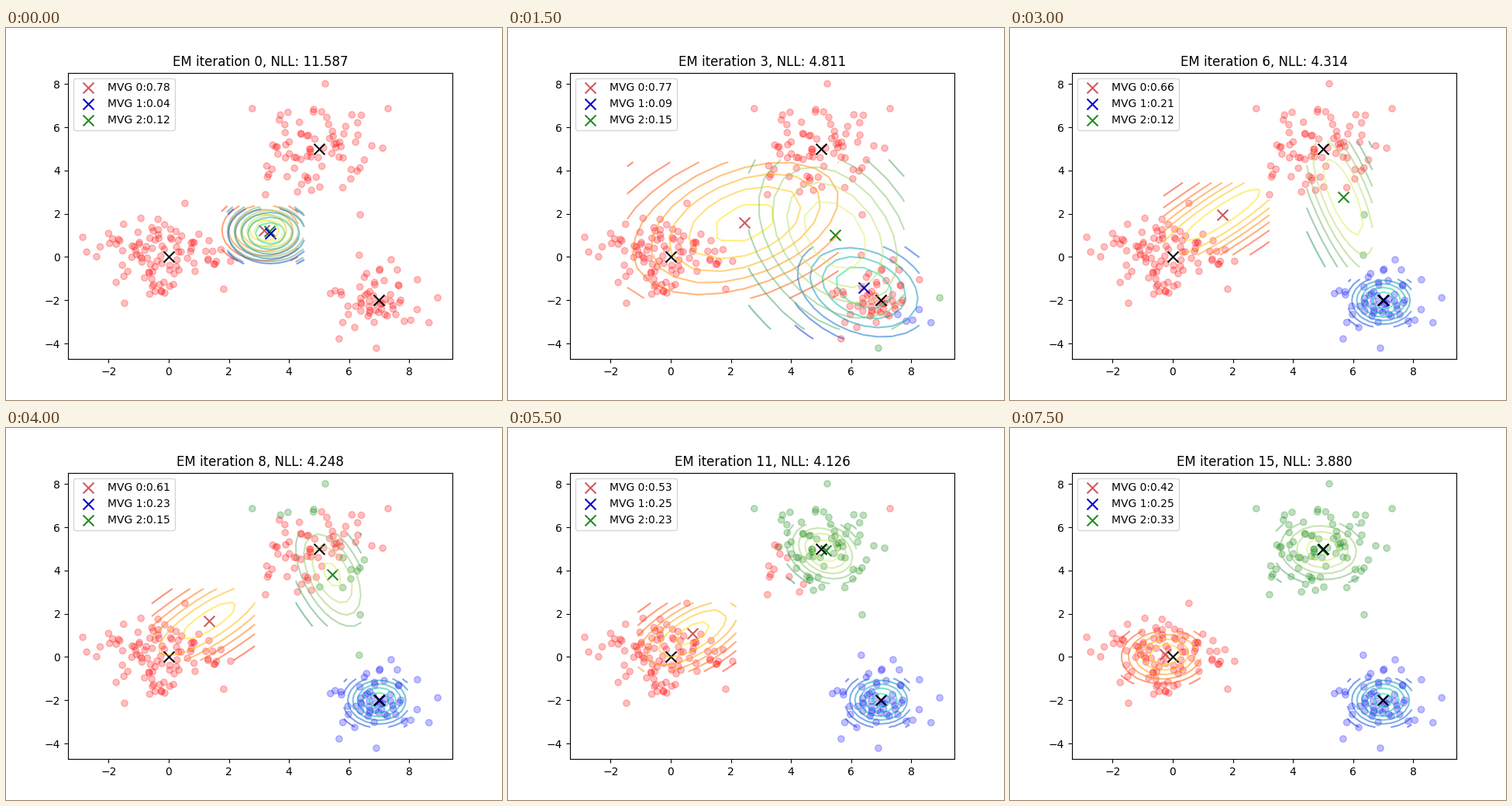
Animation of 640 by 480 pixels, one loop 8 s. Source, as a matplotlib script:

```python
import numpy as np
import matplotlib.pyplot as plt
from matplotlib.animation import FuncAnimation

STEPS = 16
CENTERS = np.array([(0, 0), (7, -2), (5, 5)])
COUNTS = (100, 60, 80)

# Key poses: mean x, mean y, conditional std x, std y, correlation, weight
KEYS = (0, 2, 4, 6, 10, 13, 15)
RED = [
    (3.17, 1.23, 1, 1, 0, .78),
    (2.81, 1.37, 3.136, 2.79, .21, .81),
    (2.11, 1.80, 2.39, 2.16, .6, .73),
    (1.65, 1.95, 1.386, 1.315, .9, .66),
    (1.03, 1.41, 1.313, 1.29, .74, .57),
    (.11, .44, 1.24, 1.16, .5, .45),
    (-.25, .11, 1.04, .96, .08, .42),
]
BLUE = [
    (3.38, 1.09, 1, 1, 0, .04),
    (5.80, -.81, 2.38, 2.37, -.47, .056),
    (7.06, -2.03, .875, .985, -.1, .12),
    (7.01, -2.01, .825, .865, 0, .21),
    (7, -2, .84, .885, 0, .25),
]
GREEN = [
    (3.35, 1.19, 1, 1, 0, .12),
    (4.95, 1.05, 2.72, 3.28, -.21, .14),
    (5.98, .98, 1.35, 2.89, -.5, .15),
    (5.67, 2.77, .857, 2.29, -.73, .12),
    (5.21, 4.85, .857, 1.09, -.3, .19),
    (5.03, 5.03, 1.02, 1.04, -.22, .30),
    (4.98, 4.96, 1.09, 1.07, -.08, .33),
]
POSES = [np.array(rows) for rows in (RED, BLUE, GREEN)]
NLL = (11.587, 5.049, 4.572, 4.314, 4.182, 4.013, 3.880)

# The farthest points of the three clusters
OUTLIERS = [
    (-2.86, .91), (-2.73, .23), (-2.40, .01), (-1.47, -2.14), (.54, 2.48),
    (2.06, -.20), (1.83, -1.49),
    (5.67, -3.79), (6.91, -4.22), (8.95, -1.89), (8.66, -3.04), (6.34, .08),
    (7.40, -.13),
    (5.21, 8.01), (2.78, 6.86), (7.30, 6.86), (3.22, 2.88), (6.37, 1.95),
    (7.12, 5.03),
]

DOT_COLORS = np.array(["red", "blue", "green"])
MARK_COLORS = ["indianred", "mediumblue", "forestgreen"]
CMAPS = ["autumn", "winter", "summer"]
GRID = np.sqrt(2) * np.arange(-1, 1, .2)


def make_data():
    """Sample each cluster from the pose its component converges to."""
    rng = np.random.RandomState(7)
    parts = [OUTLIERS]
    for pose, count in zip(POSES, COUNTS):
        z = rng.normal(size=(4 * count, 2))
        z = z[np.hypot(*z.T) < 2][:count - len(OUTLIERS) // 3]
        parts.append(pose[-1, :2] + z * pose[-1, 2:4])
    return np.vstack(parts)


def at(step, values):
    # The first update makes nearly the whole jump to the second pose.
    phase = np.interp(step, (0, 1, 2, STEPS), (0, 1.95, 2, STEPS))
    return np.interp(phase, KEYS[:len(values)], values)


def params(k, step):
    return [at(step, column) for column in POSES[k].T]


def density(x, y, mx, my, cx, cy, rho):
    u, v = (x - mx) / cx, (y - my) / cy
    peak = np.sqrt(1 - rho ** 2) / (2 * np.pi * cx * cy)
    return peak * np.exp(-(u * u + v * v - 2 * rho * u * v) / 2)


def assign(step):
    """Most likely component of every point."""
    scores = []
    for k in range(3):
        *shape, weight = params(k, step)
        scores.append(weight * density(*DATA.T, *shape))
    return np.argmax(scores, axis=0)


def cross(x, y, **style):
    ax.scatter(x, y, s=100, marker="x", linewidths=1.5, **style)


def draw(step):
    ax.cla()
    # The E-step sees the parameters of the previous iteration.
    labels = assign(max(step - 1, 0))
    ax.scatter(*DATA.T, c=DOT_COLORS[labels], alpha=.25)

    for k in range(3):
        mx, my, cx, cy, rho, weight = params(k, step)
        cross(mx, my, color=MARK_COLORS[k], label=f"MVG {k}:{weight:.2f}",
              zorder=1.2 if k == 1 else 1.1)
        gx, gy = np.meshgrid(mx + cx * GRID, my + cy * GRID)
        ax.contour(gx, gy, density(gx, gy, mx, my, cx, cy, rho),
                   cmap=CMAPS[k], alpha=.5)
    cross(*CENTERS.T, color="black", zorder=1.3)

    ax.set_xlim(-3.352, 9.438)
    ax.set_ylim(-4.724, 8.524)
    ax.legend(loc="upper left")
    ax.set_title(f"EM iteration {step}, NLL: {at(step, NLL):.3f}")


DATA = make_data()

fig, ax = plt.subplots(figsize=(6.4, 4.8), dpi=100)
anim = FuncAnimation(fig, draw, frames=STEPS, interval=500, repeat=True,
                     repeat_delay=0, cache_frame_data=False)
plt.show()
```
